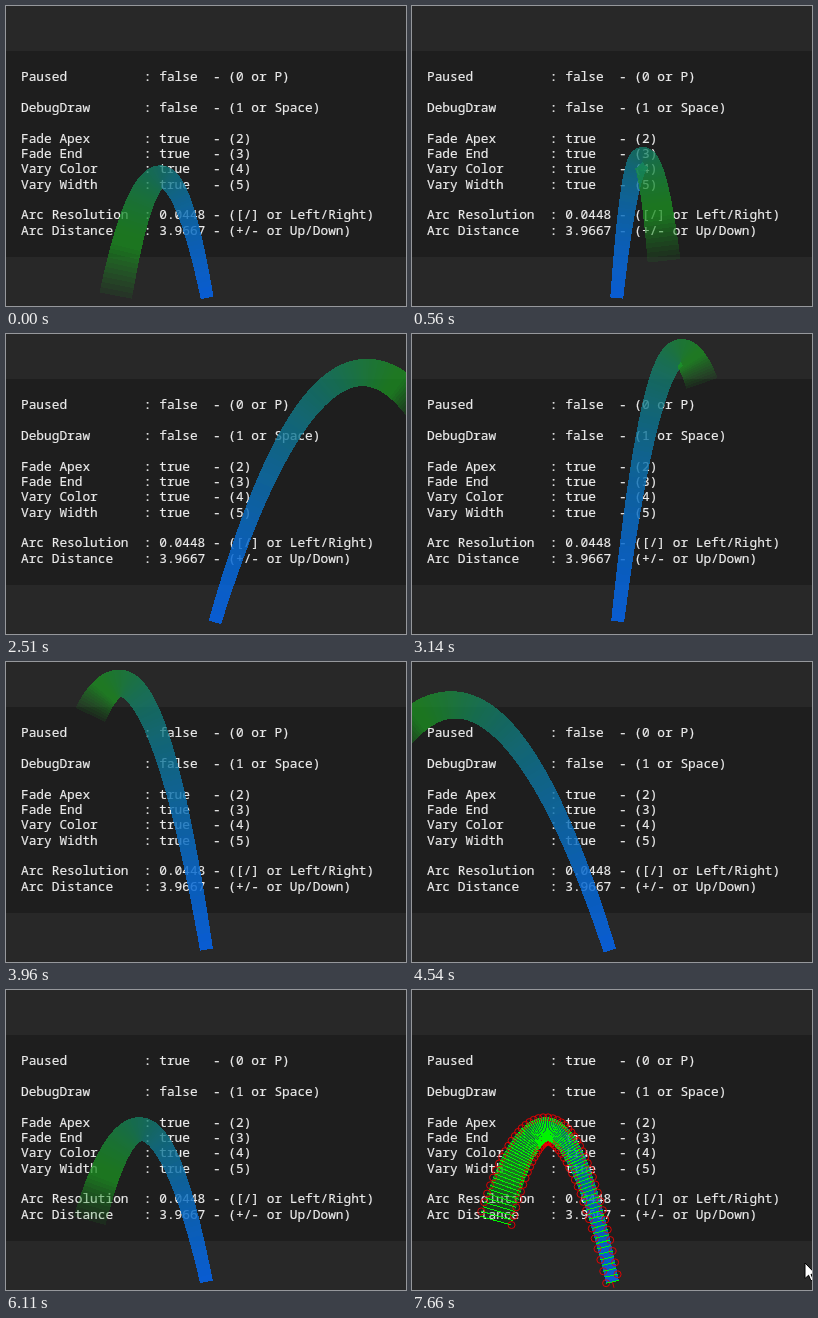
Animation of 400x300 px, one loop 8000 ms. Source, as an HTML page:

```html
<!DOCTYPE html>
<html>
<head>
<meta charset="utf-8">
<style>
html, body { margin: 0; width: 100%; height: 100%; overflow: hidden; background: #282828; }
svg { display: block; width: 100vw; height: 100vh; }
text { font-family: "Noto Sans Mono", "DejaVu Sans Mono", monospace; font-size: 12.8px; fill: #ececec; stroke: #ececec; stroke-width: 0.2px; white-space: pre; }
</style>
</head>
<body>
<svg id="stage" viewBox="0 0 400 300">
  <rect width="400" height="300" fill="#282828"/>
  <rect y="45" width="400" height="206" fill="#1e1e1e"/>
  <g id="labels"></g>
  <g id="ribbon" shape-rendering="crispEdges"></g>
  <g id="debug" fill="none">
    <path id="rings" stroke="#f00000" stroke-width="0.9"/>
    <path id="ribs" stroke="#00f500" stroke-width="1" shape-rendering="crispEdges"/>
  </g>
  <path id="cursor" d="M0 0V15.5L3.6 12.2L6 17.8L8.4 16.8L6 11.3H11Z" fill="#fff" stroke="#000" stroke-width="1"/>
</svg>
<script>
const LOOP = 8000, PAUSE = 6110, DEBUG = 6820, CURSOR = 7620;
const PERIOD = 6220, FRONT = 372;   // one turn, and when the arc faces the viewer
const SEGMENTS = 88, SPAN = 21.9;   // flight time, with gravity 2 px per unit squared
const NEAR = [5, 100, 236], FAR = [28, 145, 34];

const $ = id => document.getElementById(id);
const mix = (a, b, u) => a + (b - a) * u;

function add(parent, tag, attrs) {
  const el = document.createElementNS("http://www.w3.org/2000/svg", tag);
  for (const k in attrs) el.setAttribute(k, attrs[k]);
  return parent.appendChild(el);
}

const rows = [
  [0, "Paused", "false", "0 or P"],
  [2, "DebugDraw", "false", "1 or Space"],
  [4, "Fade Apex", "true", "2"],
  [5, "Fade End", "true", "3"],
  [6, "Vary Color", "true", "4"],
  [7, "Vary Width", "true", "5"],
  [9, "Arc Resolution", "0.0448", "[/] or Left/Right"],
  [10, "Arc Distance", "3.9667", "+/- or Up/Down"]
];
const line = (name, value, keys) => name.padEnd(16) + ": " + value.padEnd(7) + "- (" + keys + ")";
const labels = rows.map(([row, ...cells]) => {
  const el = add($("labels"), "text", { x: 15, y: 75.2 + row * 15.33 });
  el.textContent = line(...cells);
  return el;
});

function setFlag(i, on) {
  const [, name, , keys] = rows[i];
  const s = line(name, String(on), keys);
  if (labels[i].textContent !== s) labels[i].textContent = s;
}

function opacity(u) {
  const body = mix(0.87, 0.76, Math.min(1, u * 2));
  return body * Math.min(1, 0.12 + (1 - u) / 0.13);
}

const quads = [];
for (let i = 0; i < SEGMENTS; i++) {
  const u = (i + 0.5) / SEGMENTS;
  const rgb = NEAR.map((c, k) => Math.round(mix(c, FAR[k], Math.min(1, u / 0.85))));
  quads.push(add($("ribbon"), "path", { fill: `rgb(${rgb})`, "fill-opacity": opacity(u).toFixed(3) }));
}

// Ballistic path seen from above; returns the left and right edge points.
function edges(t) {
  const a = 2 * Math.PI * (t - FRONT) / PERIOD;
  const s = Math.sin(a), c = Math.cos(a);
  const x0 = 203.5 + 6.5 * s, y0 = 289.7 + 2.4 * c;
  const vx = 11.4 * s;
  const rise = 14.22 - 2.24 * c + 0.49 * s * s - 1.2 * Math.max(0, 1 - t / 700);
  const out = [];
  for (let i = 0; i <= SEGMENTS; i++) {
    const u = i / SEGMENTS, f = u * SPAN;
    const x = x0 + vx * f, y = y0 - f * (2 * rise - f);
    const dy = -2 * (rise - f), len = Math.hypot(vx, dy) || 1;
    const half = mix(6.5, 16.5, u);
    const nx = -dy / len * half, ny = vx / len * half;
    out.push([x - nx, y - ny, x + nx, y + ny].map(v => +v.toFixed(2)));
  }
  return out;
}

const ring = (x, y, r) => `M${x - r} ${y}a${r} ${r} 0 1 0 ${2 * r} 0a${r} ${r} 0 1 0 ${-2 * r} 0`;

function draw(t) {
  const pts = edges(Math.min(t, PAUSE));
  quads.forEach((q, i) => {
    const [ax, ay, bx, by] = pts[i], [cx, cy, dx, dy] = pts[i + 1];
    q.setAttribute("d", `M${ax} ${ay}L${bx} ${by}L${dx} ${dy}L${cx} ${cy}Z`);
  });

  const debug = t >= DEBUG;
  setFlag(0, t >= PAUSE);
  setFlag(1, debug);
  $("debug").style.display = debug ? "" : "none";
  if (debug) {
    const [ax, ay, bx, by] = pts[0];
    const mx = (ax + bx) / 2, my = (ay + by) / 2;
    $("ribs").setAttribute("d", pts.map(p => `M${p[0]} ${p[1]}L${p[2]} ${p[3]}`).join(""));
    // rings sit on alternating sides
    $("rings").setAttribute("d", pts.map((p, i) => i % 2 ? ring(p[2], p[3], 3.5) : ring(p[0], p[1], 3.5)).join("") +
      `M${mx} ${my}l1.5 6`);
  }

  $("cursor").style.display = t >= CURSOR ? "" : "none";
  $("cursor").setAttribute("transform", t < CURSOR + 40 ? "translate(396 276)" : "translate(393 273)");
}

function tick() {
  draw(performance.now() % LOOP);
  requestAnimationFrame(tick);
}
tick();
</script>
</body>
</html>
```
